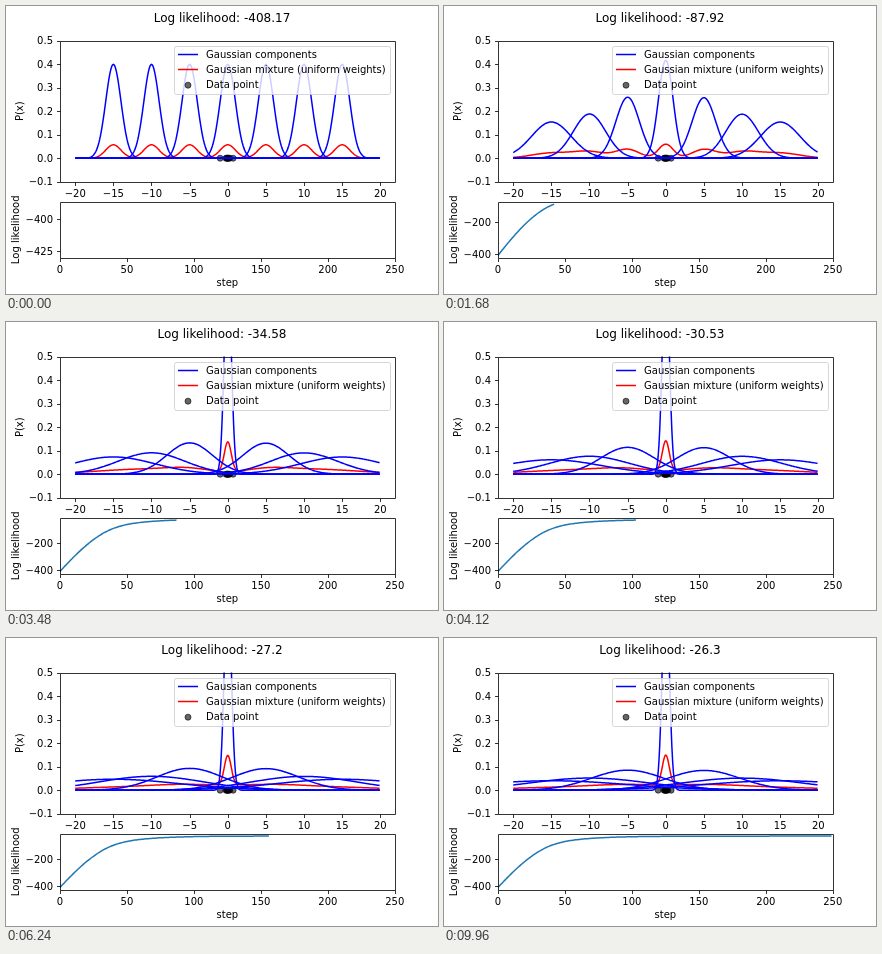
An HTML page for the animation above (10000 ms loop, 432 by 288 pixels).

```html
<!DOCTYPE html>
<html lang="en">
<head>
<meta charset="utf-8">
<title>Gaussian mixture fit</title>
<style>
  html, body { margin: 0; width: 100%; height: 100%; overflow: hidden; background: #fff; }
  svg { display: block; }
  text { font: 10px "DejaVu Sans", sans-serif; }
  .title { font-size: 12px; }
  .mid { text-anchor: middle; }
  .end { text-anchor: end; }
  .axis { fill: none; stroke: #000; stroke-width: .8; }
  .line { fill: none; stroke-width: 1.5; stroke-linejoin: round; }
  .blue { stroke: #00f; }
  .red { stroke: #f00; }
  .loss { stroke: #1f77b4; }
  .dot { stroke: #000; fill-opacity: .6; stroke-opacity: .6; }
</style>
</head>
<body>
<svg width="432" height="288" viewBox="0 0 432 288">
  <defs>
    <clipPath id="topClip"><rect x="54" y="34.56" width="334.8" height="141.19"/></clipPath>
    <clipPath id="lowClip"><rect x="54" y="195.52" width="334.8" height="56.48"/></clipPath>
  </defs>
  <text id="title" class="title mid" x="216" y="16"></text>
  <g id="dots"></g>
  <g clip-path="url(#topClip)">
    <path id="mix" class="line red"/>
    <g id="parts"></g>
  </g>
  <path id="loss" class="line loss" clip-path="url(#lowClip)"/>
  <g id="axes"></g>
  <g id="lossTicks"></g>
  <text class="mid" x="221.4" y="280">step</text>
  <text class="mid" transform="translate(17 105.2) rotate(-90)">P(x)</text>
  <text class="mid" transform="translate(13 223.8) rotate(-90)">Log likelihood</text>
  <rect x="168.5" y="40.5" width="216" height="48" rx="2" fill="#fff" fill-opacity=".8" stroke="#ccc" stroke-opacity=".8"/>
  <path class="line blue" d="M172 48.5h20"/>
  <path class="line red" d="M172 63.5h20"/>
  <circle class="dot" cx="182" cy="79.2" r="3"/>
  <text x="200" y="52">Gaussian components</text>
  <text x="200" y="67">Gaussian mixture (uniform weights)</text>
  <text x="200" y="82">Data point</text>
</svg>
<script>
const STEPS = 250, STEP_MS = 40;
const LEFT = 54, WIDTH = 334.8;
const TOP = { y0: 34.56, y1: 175.75 };
const LOW = { y0: 195.52, y1: 252 };

const data = [-1, .7, .25, .12, 0, -.05, -.12, -.23];
const mus = [-15, -10, -5, 0, 5, 10, 15];
const grid = Array.from({ length: 400 }, (_, i) => -20 + i / 10);

const $ = id => document.getElementById(id);
const snap = v => Math.floor(v + .5) + .5;
const minus = s => String(s).replace('-', '\u2212');
const lerp = (a, b, f) => a + (b - a) * f;

const px = x => LEFT + (x + 21.995) / 43.89 * WIDTH;
const py = p => TOP.y1 - (p + .1) / .6 * (TOP.y1 - TOP.y0);
const sx = n => LEFT + n / STEPS * WIDTH;

// Gradient ascent on the widths, walked in equal arc lengths.
const spread = mus.map(m => data.reduce((s, x) => s + (x - m) ** 2, 0) / data.length);

function logLik(sig) {
  const half = .5 * Math.log(2 * Math.PI);
  const sum = sig.reduce((s, v, k) => s + half + Math.log(v) + spread[k] / (2 * v * v), 0);
  return -sum * data.length / mus.length;
}

function ascend(limit) {
  const h = .002, path = [];
  let sig = mus.map(() => 1), ll = logLik(sig);
  for (let i = 0; i < 20000; i++) {
    path.push({ len: i * h, ll, sig });
    if (ll > limit) break;
    const g = sig.map((v, k) => spread[k] / v ** 3 - 1 / v);
    const norm = Math.hypot(...g);
    sig = sig.map((v, k) => v + h * g[k] / norm);
    ll = logLik(sig);
  }
  return path;
}

function lookup(path, key, value) {
  let lo = 0, hi = path.length - 1;
  while (hi - lo > 1) {
    const mid = (lo + hi) >> 1;
    if (path[mid][key] <= value) lo = mid; else hi = mid;
  }
  const a = path[lo], b = path[hi], f = (value - a[key]) / (b[key] - a[key]);
  return {
    len: lerp(a.len, b.len, f),
    ll: lerp(a.ll, b.ll, f),
    sig: a.sig.map((v, k) => lerp(v, b.sig[k], f))
  };
}

// step, log likelihood, walking speed per step
const pace = [
  [0, -408.17, .027], [25, -177.03, .075], [60, -51.89, .12], [87, -34.58, .125],
  [122, -28.4, .07], [196, -26.64, .028], [249, -26.3, .017]
];

function buildStates() {
  const path = ascend(-26.29);
  const keys = pace.map(([n, ll, v], i) => ({ n, v, len: i ? lookup(path, 'll', ll).len : 0 }));
  return Array.from({ length: STEPS }, (_, n) => {
    const i = Math.max(1, keys.findIndex(k => k.n >= n));
    const a = keys[i - 1], b = keys[i], w = b.n - a.n, f = (n - a.n) / w;
    const rise = f * f * (3 - 2 * f);
    const len = lerp(a.len, b.len, rise)
      + w * f * (1 - f) * (a.v * (1 - f) - b.v * f);
    return lookup(path, 'len', len);
  });
}

const states = buildStates();

const toPath = pts => 'M' + pts.map(([x, y]) => x.toFixed(2) + ' ' + y.toFixed(2)).join('L');
const curve = ps => toPath(ps.map((p, i) => [px(grid[i]), py(p)]));
const label = (cls, x, y, s) => `<text class="${cls}" x="${x}" y="${y}">${minus(s)}</text>`;

function xTick(x, base, s) {
  return `<path class="axis" d="M${snap(x)} ${snap(base)}v3.5"/>`
    + label('mid', x, Math.round(base) + 15, s);
}

function yTick(y, s) {
  return `<path class="axis" d="M${LEFT + .5} ${snap(y)}h-3.5"/>`
    + label('end', 47, Math.round(y + 3.7), s);
}

function frame({ y0, y1 }) {
  const l = snap(LEFT), r = snap(LEFT + WIDTH), t = snap(y0), b = snap(y1);
  return `<path class="axis" d="M${l} ${t}H${r}V${b}H${l}Z"/>`;
}

function drawFixed() {
  let s = frame(TOP) + frame(LOW);
  for (let x = -20; x <= 20; x += 5) s += xTick(px(x), TOP.y1, x);
  for (let i = -1; i <= 5; i++) s += yTick(py(i / 10), (i / 10).toFixed(1));
  for (let n = 0; n <= STEPS; n += 50) s += xTick(sx(n), LOW.y1, n);
  $('axes').innerHTML = s;
  $('dots').innerHTML = data.map(x =>
    `<circle class="dot" cx="${px(x)}" cy="${py(0)}" r="3"/>`).join('');
  $('parts').innerHTML = mus.map(() => '<path class="line blue"/>').join('');
}

// Largest round interval that still leaves two ticks in view.
function niceTicks(lo, hi) {
  const raw = (hi - lo) / 2, scale = 10 ** Math.floor(Math.log10(raw));
  const sizes = [.1, .2, .25, .5, 1, 2, 2.5, 5, 10, 20].map(v => v * scale);
  let i = sizes.findIndex(v => v >= raw), ticks = [];
  for (; i >= 0; i--) {
    const size = sizes[i];
    ticks = [];
    for (let k = Math.ceil(lo / size); k * size <= hi; k++) ticks.push(k * size);
    if (ticks.length > 1) break;
  }
  return { ticks, digits: sizes[i] % 1 ? 1 : 0 };
}

function drawLoss(n) {
  let lo = states[0].ll, hi = states[n].ll;
  if (n === 0) { lo *= 1.05; hi *= .95; }
  const pad = (hi - lo) * .05;
  lo -= pad;
  hi += pad;
  const ly = v => LOW.y1 - (v - lo) / (hi - lo) * (LOW.y1 - LOW.y0);
  const { ticks, digits } = niceTicks(lo, hi);
  $('lossTicks').innerHTML = ticks.map(v => yTick(ly(v), v.toFixed(digits))).join('');
  const pts = states.slice(0, n + 1).map((s, i) => [sx(i), ly(s.ll)]);
  $('loss').setAttribute('d', n ? toPath(pts) : '');
}

function draw(n) {
  const { sig, ll } = states[n];
  const parts = mus.map((m, k) => grid.map(x =>
    Math.exp(-.5 * ((x - m) / sig[k]) ** 2) / (sig[k] * Math.sqrt(2 * Math.PI))));
  parts.forEach((p, k) => $('parts').children[k].setAttribute('d', curve(p)));
  const mix = grid.map((_, i) => parts.reduce((s, p) => s + p[i], 0) / mus.length);
  $('mix').setAttribute('d', curve(mix));
  $('title').textContent = 'Log likelihood: ' + +ll.toFixed(2);
  drawLoss(n);
}

drawFixed();
const start = performance.now();
let shown = -1;
function tick() {
  const n = Math.floor((performance.now() - start) / STEP_MS) % STEPS;
  if (n !== shown) draw(shown = n);
  requestAnimationFrame(tick);
}
tick();
</script>
</body>
</html>
```
